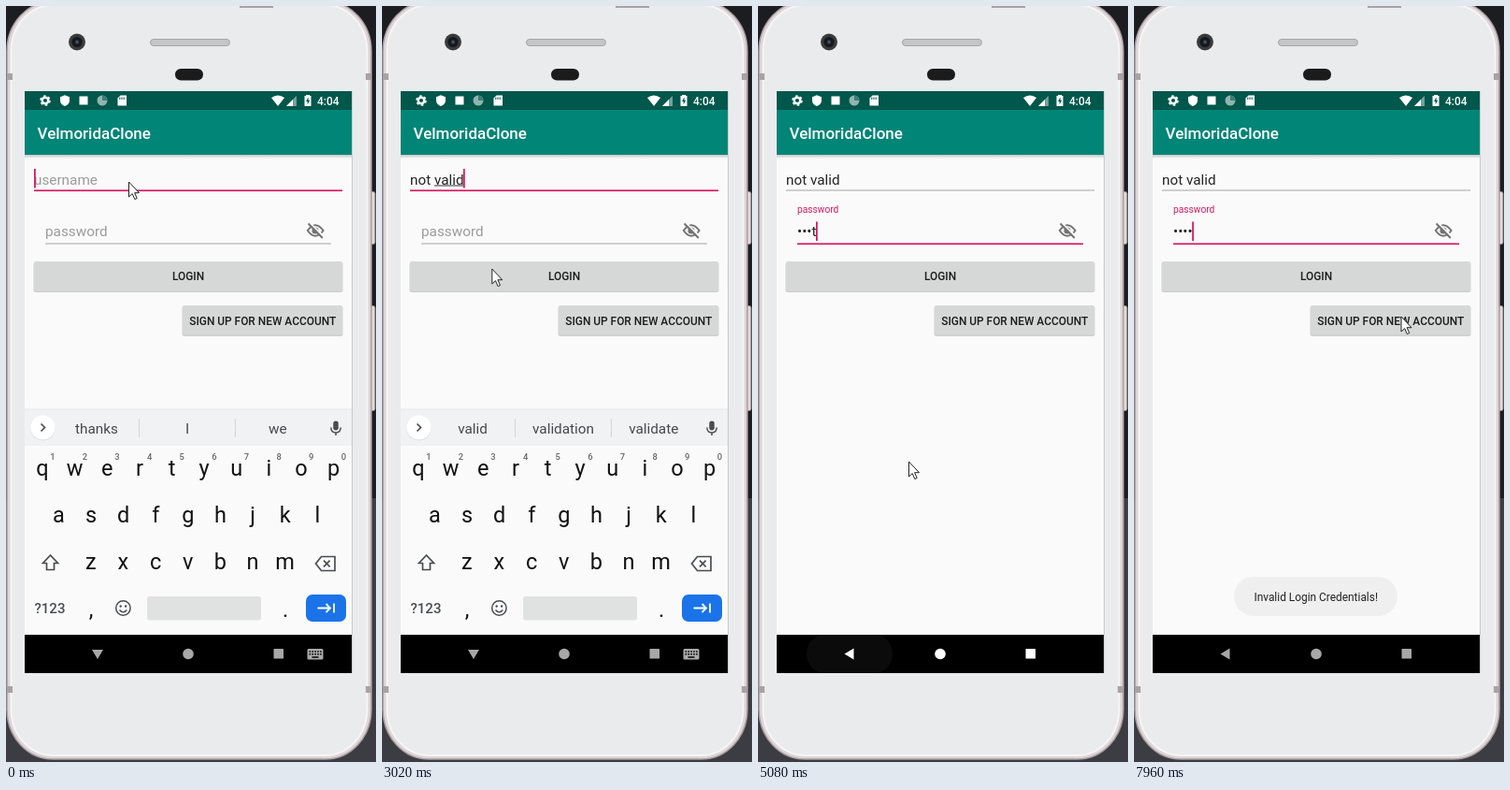
An HTML page that plays this animation: 396x808 px, repeating every 8000 ms.

```html
<!DOCTYPE html>
<html lang="en">
<head>
<meta charset="utf-8">
<title>Login screen</title>
<style>
html, body { margin: 0; width: 100%; height: 100%; overflow: hidden; background: #202124; }
svg { display: block; width: 396px; height: 808px; font-family: Roboto, "Noto Sans", sans-serif; }
text { white-space: pre; }
.field { font-size: 15.3px; fill: #242424; }
.hint { font-size: 15.3px; fill: #9b9b9b; }
.btn { font-size: 11.9px; font-weight: 500; fill: #1c1c1c; text-anchor: middle; }
.key { font-size: 23.5px; fill: #111; text-anchor: middle; }
.sup { font-size: 9.4px; font-weight: 500; fill: #666; text-anchor: middle; }
.num { font-size: 20.5px; fill: #222; text-anchor: middle; }
.word { font-size: 15.3px; fill: #45494d; text-anchor: middle; }
.line { fill: none; stroke: #4a4d50; stroke-width: 1.7; }
</style>
</head>
<body>
<svg id="stage" viewBox="0 0 396 808">
  <defs>
    <clipPath id="view"><rect x="20" y="91" width="350" height="581"/></clipPath>
    <clipPath id="nav"><rect x="20" y="672" width="350" height="41"/></clipPath>
    <clipPath id="login"><rect x="30" y="273" width="330" height="31" rx="2"/></clipPath>
    <linearGradient id="shade" x2="0" y2="1">
      <stop stop-color="#000" stop-opacity=".22"/><stop offset="1" stop-color="#000" stop-opacity="0"/>
    </linearGradient>
  </defs>

  <!-- phone -->
  <rect width="396" height="808" fill="#1c1d20"/>
  <rect y="526" width="396" height="282" fill="#3b3d42"/>
  <g fill="#e2dcdd" stroke="#8f8788">
    <rect x="388" y="198.500" width="7" height="56" rx="2"/>
    <rect x="388" y="320.500" width="7" height="112" rx="2"/>
  </g>
  <rect x="1" y="-5" width="390" height="810" rx="49" ry="53" fill="#ded5d7" stroke="#a89da0" stroke-width="1.500"/>
  <rect x="5.500" y="-1" width="381" height="802" rx="45" ry="49" fill="#e9ebed" stroke="#f7f5f6" stroke-width="2"/>
  <g fill="#a9a2a5">
    <rect x="1" y="72" width="6" height="7"/><rect x="385" y="72" width="6" height="7"/>
    <rect x="1" y="727" width="6" height="7"/><rect x="385" y="727" width="6" height="7"/>
    <rect x="250" width="36" height="2"/>
  </g>
  <circle cx="76" cy="38.500" r="9" fill="#3b3b3d"/>
  <circle cx="76" cy="38.500" r="5.500" fill="#17181c"/>
  <circle cx="76" cy="38.500" r="2" fill="#39506b"/>
  <rect x="154.500" y="35.500" width="85" height="7" rx="3.500" fill="#c5c6c8" stroke="#a5a6a8"/>
  <rect x="181" y="67" width="30" height="12.500" rx="6.200" fill="#1b1b1c"/>

  <!-- app -->
  <rect x="20" y="91" width="351" height="622" fill="#c8c9ca"/>
  <rect x="20" y="91" width="350" height="581" fill="#fafafa"/>
  <rect x="20" y="159" width="350" height="4" fill="url(#shade)"/>
  <rect x="20" y="111" width="350" height="48" fill="#008577"/>
  <rect x="20" y="91" width="350" height="20" fill="#00574b"/>
  <text x="33.500" y="142" font-size="17" font-weight="500" fill="#fff">VelmoridaClone</text>
  <g fill="#fff">
    <circle cx="42" cy="101" r="3.300" fill="none" stroke="#fff" stroke-width="2.400"/>
    <circle cx="42" cy="101" r="5" fill="none" stroke="#fff" stroke-width="1.600" stroke-dasharray="2.600 2.636"/>
    <path d="M63 95.300L68 97.300V101Q68 105 63 107Q58 105 58 101V97.300Z"/>
    <rect x="78.500" y="96.500" width="9" height="9"/>
    <circle cx="103" cy="101" r="5.500" fill="#8fb5af"/>
    <path d="M103 95.500A5.500 5.500 0 0 1 108.500 101L103 101Z" fill="#3f7d74"/>
    <path d="M122.500 95.500H129V106.500H119.500V98.500Z"/>
    <path d="M121.800 97.500V100M124 97.500V100M126.200 97.500V100" stroke="#00574b"/>
    <path d="M284 98Q291 93 298 98L291 107Z"/>
    <path d="M300 107L311 96V107Z" opacity=".45"/><path d="M300 107L307 100V107Z"/>
    <path d="M321 96H319.500V107H326.500V96H325V95H321Z"/>
    <path d="M323.600 97.500L321 102H322.700V105.200L325.300 100.700H323.600Z" fill="#00574b"/>
    <text x="333" y="105.500" font-size="11.900" font-weight="500">4:04</text>
  </g>

  <text class="hint" id="userHint" x="30" y="190.500">username</text>
  <text class="field" id="user" x="30" y="190.500"></text>
  <rect id="compose" y="191.500" height="1" fill="#333"/>
  <rect id="userLine" x="30" width="330"/>
  <text id="passHint" x="42">password</text>
  <text class="field" id="pass" x="42" y="245.500"></text>
  <rect id="passLine" x="42" width="306"/>
  <g fill="none" stroke="#737373" stroke-width="2">
    <path d="M322.800 240Q331 228.500 339.600 240Q331 251.500 322.800 240Z"/>
    <circle cx="331" cy="240" r="2.600" fill="#737373"/>
    <path d="M325 231.600L340.500 246.800" stroke="#fafafa"/>
    <path d="M323.500 232.500L338.800 248"/>
  </g>
  <rect id="caret"/>

  <g fill="#000" opacity=".16">
    <rect x="29.500" y="273.500" width="331" height="32.500" rx="2.500"/>
    <rect x="188.500" y="320.500" width="172" height="32.500" rx="2.500"/>
  </g>
  <rect x="30" y="273" width="330" height="31.500" rx="2" fill="#d6d7d7"/>
  <rect x="189" y="320" width="171" height="31.500" rx="2" fill="#d6d7d7"/>
  <g id="press" clip-path="url(#login)">
    <rect x="30" y="273" width="330" height="32" opacity=".03"/>
  </g>
  <circle id="ripple" cx="203" cy="285" opacity=".05" clip-path="url(#login)"/>
  <text class="btn" x="195" y="293">LOGIN</text>
  <text class="btn" x="274.700" y="340.700">SIGN UP FOR NEW ACCOUNT</text>

  <!-- keyboard -->
  <g clip-path="url(#view)"><g id="board">
    <rect x="20" y="431" width="350" height="241" fill="#fafafa"/>
    <rect x="20" y="431" width="350" height="39" fill="#f0f2f4"/>
    <rect x="20" y="430.500" width="350" height="1" fill="#e6e8ea"/>
    <g id="letters"></g>
    <g id="textMode">
      <circle cx="39.500" cy="451.500" r="13" fill="#dcdee0"/><circle cx="39.500" cy="450.500" r="13" fill="#fff"/>
      <path class="line" d="M37.500 446.500L41.500 450.500L37.500 454.500"/>
      <path d="M142.500 441V461M245.500 441V461" stroke="#d3d5d8"/>
      <g fill="none" stroke="#4a4d50" stroke-width="1.500">
        <rect x="351" y="444.200" width="4" height="8.500" rx="2" fill="#4a4d50"/>
        <path d="M347.800 450.500Q348 456 353 456T358.200 450.500M353 456V459"/>
        <circle cx="125.400" cy="643.500" r="7.700"/>
        <path d="M121.500 645.500Q125.400 650 129.300 645.500"/>
      </g>
      <g fill="#4a4d50"><circle cx="122.700" cy="641.500" r="1.200"/><circle cx="128.100" cy="641.500" r="1.200"/></g>
    </g>
    <g id="passMode"></g>
    <path class="line" d="M47.500 587L39.500 595.500H43.500V602.500H51.500V595.500H55.500Z"/>
    <path class="line" d="M337.500 588.500H352V603.500H337.500L331.500 596Z"/>
    <path class="line" d="M340 592.700L346.600 599.300M346.600 592.700L340 599.300"/>
    <text x="47" y="649" font-size="15" font-weight="500" fill="#4a4d50" text-anchor="middle">?123</text>
    <rect id="space" y="631" height="25.500" rx="3" fill="#e0e1e1"/>
    <rect x="321" y="629" width="43" height="29" rx="7" fill="#1a73e8"/>
    <path id="action" fill="none" stroke="#fff" stroke-width="1.800"/>
  </g></g>

  <g id="toast">
    <rect x="107" y="610" width="175" height="42" rx="21" fill="#efefef"/>
    <text x="194.700" y="635.700" font-size="11.900" fill="#222" text-anchor="middle">Invalid Login Credentials!</text>
  </g>

  <!-- navigation bar -->
  <rect x="20" y="672" width="350" height="41"/>
  <g clip-path="url(#nav)"><rect id="backRipple" y="672" height="41" rx="20" fill="#fff"/></g>
  <g id="navIcons">
    <path id="back" d="M-5.500 0L4.500 -6V6Z"/>
    <circle cx="195" cy="692.500" r="5.800"/>
    <rect x="286.500" y="687" width="10.500" height="10.500" rx=".5"/>
  </g>
  <g id="keysIcon">
    <rect x="322.500" y="687" width="17" height="11.500" rx="1.500" fill="#aaa"/>
    <path d="M324.500 690H338M324.500 692.800H338" stroke="#000" stroke-width="1.600" stroke-dasharray="1.600 1.300"/>
    <path d="M327.500 696H334.500" stroke="#000" stroke-width="1.500"/>
  </g>

  <path id="mouse" d="M0 0V16L3.700 12.600L6.300 18.600L8.700 17.500L6.100 11.700H11Z" fill="#fff" stroke="#222" stroke-width="1"/>
</svg>
<script>
const LOOP = 8000;
const PINK = '#d81b60';
const $ = id => document.getElementById(id);
const set = (id, attrs) => { for (const k in attrs) $(id).setAttribute(k, attrs[k]); };
const show = (id, on) => set(id, { visibility: on ? 'visible' : 'hidden' });
const say = (id, s) => { if ($(id).textContent !== s) $(id).textContent = s; };
const ramp = (t, a, b) => Math.min(1, Math.max(0, (t - a) / (b - a)));
const ease = k => k * k * (3 - 2 * k);
const mix = (a, b, k) => a + (b - a) * k;

function label(parent, cls, x, y, s) {
  const el = document.createElementNS('http://www.w3.org/2000/svg', 'text');
  el.setAttribute('class', cls);
  el.setAttribute('x', x);
  el.setAttribute('y', y);
  el.textContent = s;
  $(parent).append(el);
  return el;
}

const STEP = 34.62;
const row = (chars, x, y) =>
  [...chars].forEach((c, i) => label('letters', 'key', x + i * STEP, y, c));
row('qwertyuiop', 39, 502);
row('asdfghjkl', 56.4, 552);
row('zxcvbnm', 90.8, 602);
row(',', 91, 653);
row('.', 299, 653);
[...'1234567890'].forEach((c, i) => {
  label('textMode', 'sup', 49.8 + i * STEP, 485, c);
  label('passMode', 'num', 38.8 + i * STEP, 458.5, c);
});
const words = [97, 194, 290.7].map(x => label('textMode', 'word', x, 457, ''));

// time, typed text, suggestions
const USER = [
  [0, '', 'thanks,I,we'],
  [994, 'n', 'no,not,now'],
  [1128, 'no', 'no,not,now'],
  [1262, 'not', 'not,note,nothing'],
  [1330, 'not ', 'sure,a,the'],
  [1396, 'not v', 'very,v,valid'],
  [1530, 'not va', 'valid,vacation,van'],
  [1664, 'not val', 'valid,value,Val'],
  [1730, 'not vali', 'valid,validate,valid'],
  [1800, 'not valid', 'valid,validation,validate']
];
const PASS = [[0, ''], [3570, 't'], [3710, '•e'], [3850, '••s'], [3990, '•••t'], [5490, '••••']];
const BLINK = [430, 860, 2330, 2800, 4290, 4860, 5360, 5860, 6360, 6840, 7320, 7900];
// time, x, y of the pointer tip
const PATH = [
  [0, 131.5, 188], [2130, 131.5, 188], [2200, 131.5, 195], [2600, 128, 373],
  [2750, 126, 370], [3170, 114.5, 245], [4290, 114.5, 245], [4690, 93.5, 690],
  [4860, 93.5, 690], [5080, 161.5, 487], [5210, 175, 505], [5360, 210, 518],
  [5520, 242, 470], [5870, 206, 283], [7300, 206, 283], [7900, 286, 332], [8000, 286, 332]
];
const at = (table, t) => table.filter(s => s[0] <= t).pop();

function pointer(t) {
  const i = Math.max(1, PATH.findIndex(p => p[0] > t));
  const [a, ax, ay] = PATH[i - 1], [b, bx, by] = PATH[i];
  const k = ease(ramp(t, a, b));
  return [mix(ax, bx, k), mix(ay, by, k)];
}

function fields(t) {
  const inPass = t >= 3290;
  const [, user, hints] = at(USER, t);
  const pass = at(PASS, t)[1];
  say('user', user);
  say('pass', pass);
  show('userHint', !user);
  hints.split(',').forEach((w, i) => { words[i].textContent = w; });

  const width = s => { say('user', s); return $('user').getComputedTextLength(); };
  const start = user.lastIndexOf(' ') + 1;
  const left = start ? width(user.slice(0, start)) : 0;
  const right = user ? width(user) : 0;
  set('compose', { x: 30 + left, width: Math.max(0, right - left) });
  show('compose', !inPass);

  const line = on => on ? { height: 1.7, fill: PINK } : { height: 1.2, fill: '#b3b3b3' };
  set('userLine', { y: 196.4, ...line(!inPass) });
  set('passLine', { y: 253.4, ...line(inPass) });

  const k = ease(ramp(t, 3290, 3460));
  set('passHint', { y: mix(245.5, 220.5, k), 'font-size': mix(15.3, 10.2, k), fill: inPass ? PINK : '#9b9b9b' });

  const thin = inPass && t < 3850;
  const end = pass ? $('pass').getComputedTextLength() : 0;
  set('caret', {
    x: inPass ? 42 + end - (thin ? 0.3 : 0.5) : 30 + right - (right ? 0.7 : 0),
    y: inPass ? 230.5 : 174,
    width: thin ? 1 : 1.8,
    height: 20.5,
    fill: thin ? '#555' : PINK
  });
  show('caret', BLINK.filter(b => b <= t).length % 2 === 0);
}

function keyboard(t) {
  const secret = t >= 3290;
  const out = ramp(t, 4830, 5060);
  set('board', { transform: `translate(0 ${241 * out * out})`, opacity: 1 - out });
  show('textMode', !secret);
  show('passMode', secret);
  set('space', secret ? { x: 117, width: 156 } : { x: 151, width: 122 });
  set('action', {
    d: secret ? 'M335 644L340 649L350 638.500' : 'M333.500 643.500H347M342.500 639L347 643.500L342.500 648M351 638.500V648.500'
  });
}

function navigation(t) {
  const lit = ramp(t, 4940, 5060) - ramp(t, 7430, 7800);
  const c = Math.round(mix(168, 255, lit));
  set('navIcons', { fill: `rgb(${c},${c},${c})` });
  const turn = -90 * (1 - ease(ramp(t, 4660, 4790)));
  set('back', { transform: `translate(98 692.500) rotate(${turn})` });
  show('keysIcon', t < 4780);
  const w = mix(66, 92, ramp(t, 4700, 5060));
  set('backRipple', {
    x: 98 - w / 2, width: w,
    opacity: 0.13 * ramp(t, 4680, 4790) * (1 - ramp(t, 4860, 5190))
  });
}

function result(t) {
  const fade = 1 - ramp(t, 6400, 6650);
  const down = t >= 6130;
  set('press', { opacity: down ? fade : 0 });
  set('ripple', { r: down ? 20 + 180 * ease(ramp(t, 6180, 6460)) : 0, opacity: 0.05 * fade });
  set('toast', { opacity: ramp(t, 6660, 6840) });
}

function draw(t) {
  fields(t);
  keyboard(t);
  navigation(t);
  result(t);
  const [x, y] = pointer(t);
  set('mouse', { transform: `translate(${x} ${y})` });
}

const begin = performance.now();
function tick() {
  draw((performance.now() - begin) % LOOP);
  requestAnimationFrame(tick);
}
tick();
</script>
</body>
</html>
```
